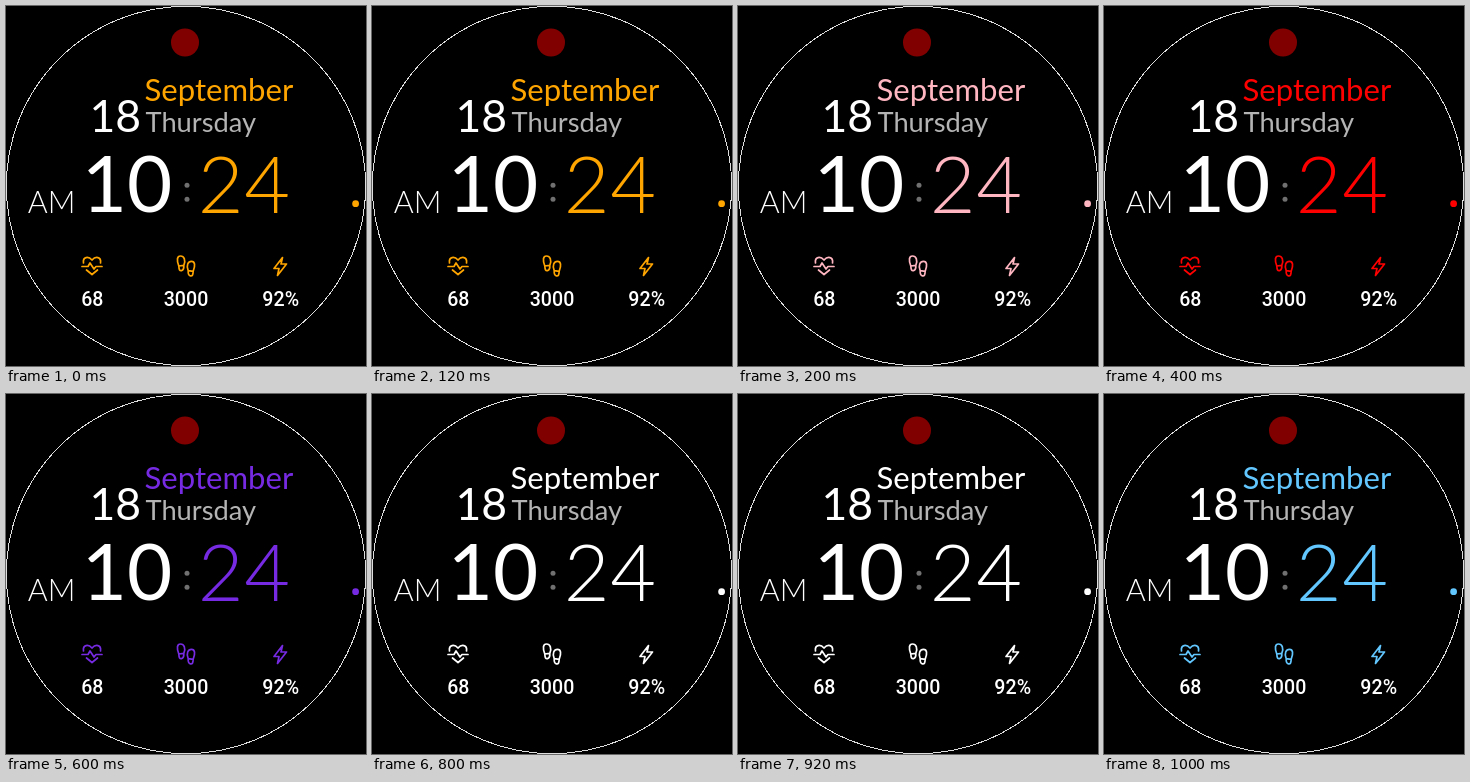
These frames come from a looping animation (360 px wide and 360 px high, 1.2 s). An HTML page:

```html
<!DOCTYPE html>
<html lang="en">
<head>
<meta charset="utf-8">
<title>Watch face</title>
<style>
  html, body { margin: 0; width: 100%; height: 100%; overflow: hidden; background: #000; }
  svg { display: block; width: 100%; height: 100%; font-family: Lato, sans-serif; fill: #fff; }
  .accent { fill: var(--accent); }
  .light { font-weight: 300; }
  .icons { fill: none; stroke: var(--accent); stroke-width: 1.7; stroke-linejoin: round; stroke-linecap: round; }
  .stats { font: 500 19.6px Roboto, sans-serif; text-anchor: middle; }
</style>
</head>
<body>
<svg id="face" viewBox="0 0 360 360">
  <circle cx="180" cy="180" r="179.7" fill="none" stroke="#ddd" shape-rendering="crispEdges"/>
  <circle cx="179" cy="36.5" r="14" fill="#800000"/>

  <text x="83.4" y="126" font-size="44.5">18</text>
  <text class="accent" x="138.6" y="95" font-size="31.1">September</text>
  <text x="139.5" y="126" font-size="27.3" fill="#b4b4b4">Thursday</text>

  <text class="light" x="21.7" y="206.5" font-size="30.5">AM</text>
  <text x="75.8" y="206.3" font-size="78">10</text>
  <g fill="#707070">
    <circle cx="181" cy="179.3" r="2.5"/>
    <circle cx="181" cy="193.3" r="2.5"/>
  </g>
  <text class="light accent" x="191.7" y="206.5" font-size="79" letter-spacing=".8">24</text>
  <circle class="accent" cx="349.6" cy="197.7" r="3.4"/>

  <g class="icons">
    <path d="M77.5 257C76.5 250.5 82.5 250 86 254C89.5 250 95.5 250.5 94.5 257M76 260.5H82L84 257L88 263L90 260.5H96M80.5 264L86 268.5L91.5 264"/>
    <path id="foot" d="M172.8 260L177.8 259.3C180 254 178 250 174.5 250C171 250 170.5 254 172.8 260C173 264 173.8 265 175.5 264.6C178 264 178 262 177.8 259.3"/>
    <use href="#foot" transform="translate(360 5.3) scale(-1 1)"/>
    <path d="M276.5 251.5L268 262.5H273L271.5 269.5L280.5 258H275Z"/>
  </g>

  <g class="stats">
    <text x="86.3" y="300">68</text>
    <text x="180" y="300">3000</text>
    <text x="274.7" y="300">92%</text>
  </g>
</svg>
<script>
  const face = document.getElementById('face');
  const colors = ['#ffa500', '#ffb6c1', '#ff0000', '#762be2', '#ffffff', '#63c7ff'];
  const hold = 200;

  function draw() {
    const step = Math.floor(performance.now() / hold) % colors.length;
    face.style.setProperty('--accent', colors[step]);
    requestAnimationFrame(draw);
  }
  draw();
</script>
</body>
</html>
```
